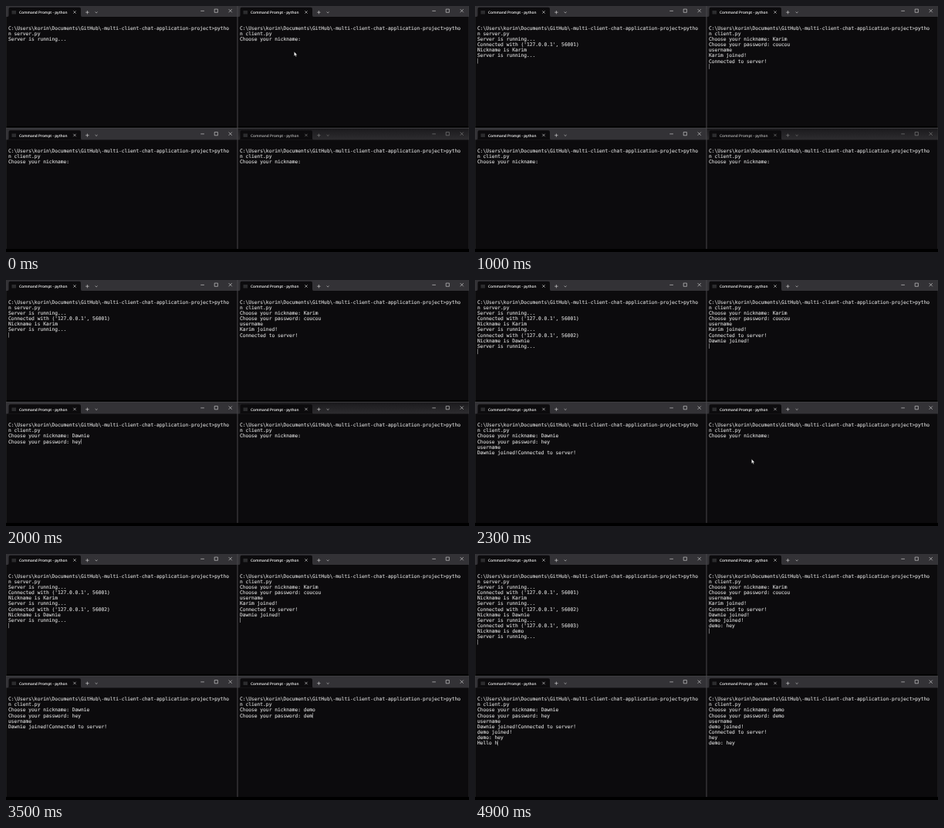
Recreate the animation shown at these times as an HTML page. Size 600 px wide and 319 px high, loop 5000 ms.

```html
<!DOCTYPE html>
<html lang="en">
<head>
<meta charset="utf-8">
<title>Chat in four terminals</title>
<style>
html, body { margin: 0; height: 100%; overflow: hidden; background: #000; }
svg { display: block; width: 600px; height: 319px; }
text { white-space: pre; text-rendering: geometricPrecision; }
.line { font: 6.25px "DejaVu Sans Mono", monospace; fill: #d4d4d4; stroke: #d4d4d4; stroke-width: .14; }
.title { font: 600 4.78px "Open Sans", sans-serif; fill: #fff; }
.icons { fill: none; stroke: #ddd; stroke-width: .6; }
.dim .title { fill: #bbb; }
.dim .icons { stroke: #888; }
</style>
</head>
<body>
<svg id="stage" viewBox="0 0 600 319"></svg>
<script>
const LOOP = 5000, CHAR = 3.763, LINE = 7.16, ROWS = 13;
const stage = document.getElementById('stage');

const shell = String.raw`C:\Users\korin\Documents\GitHub\-multi-client-chat-application-project>pytho` + '\nn ';
const client = shell + 'client.py\nChoose your nickname: ';
const askPassword = '\nChoose your password: ';
const accept = (port, name) =>
  `Connected with ('127.0.0.1', ${port})\nNickname is ${name}\nServer is running...\n`;
// one chunk of typing every 100 ms
const type = (start, ...chunks) => chunks.map((s, i) => [start + i * 100, s]);

// log: [time, appended text]; caret: times at which it toggles, starting hidden
const panels = [
  { x: 0, y: 0, caret: [1000], log: [
    [0, shell + 'server.py\nServer is running...\n'],
    [1000, accept(56001, 'Karim')],
    [2100, accept(56002, 'Dawnie')],
    [3600, accept(56003, 'demo')]] },
  { x: 300, y: 0, caret: [100, 700, 800, 1200, 2100], log: [
    [0, client],
    ...type(100, ...'Karim'),
    ...type(700, askPassword, 'cou', 'cou', '\nusername\nKarim joined!\nConnected to server!\n'),
    [2100, 'Dawnie joined!\n'],
    [3600, 'demo joined!\n'],
    [3800, 'demo: hey\n']] },
  { x: 0, y: 159.5, caret: [1300, 2300, 3600], log: [
    [0, client],
    ...type(1500, 'D', 'awn', 'i', 'e' + askPassword, 'h', 'ey',
      '\nusername\nDawnie joined!Connected to server!\n'),
    [3600, 'demo joined!\n'],
    [3800, 'demo: hey\n'],
    ...type(4500, 'He', 'l', 'l', 'o ', 'h')] },
  { x: 300, y: 159.5, caret: [2900, 4100], dimUntil: 1200, darkUntil: 2300, log: [
    [0, client],
    ...type(3100, 'd', 'em', 'o' + askPassword),
    ...type(3500, 'dem', 'o\nusername\ndemo joined!\nConnected to server!\n', 'hey', '\ndemo: hey\n')] }
];

// [time, x, y]; no position means hidden
const pointerPath = [
  [0, 373.4, 59.3], [100], [700, 373.4, 86.2], [800],
  [1200, 330, 150], [1300, 246, 222], [1500],
  [2300, 358.4, 232.3], [2400, 368, 240], [2500, 378, 246], [2600, 384, 240],
  [2700, 388, 226], [2800, 390, 214], [3100],
  [4000, 292, 205], [4100, 262, 206], [4200, 246, 208], [4300]
];

const windowMarkup = ({ x, y }) => `
  <g class="window" transform="translate(${x} ${y})">
    <rect y="-1" width="300" height="157" fill="#0c0b0d"/>
    <rect class="bar" y="-1" width="300" height="15"/>
    <path d="M2 14Q3.5 14 3.5 12V4Q3.5 1.8 5.5 1.8H95Q97 1.8 97 4V12Q97 14 98.5 14Z" fill="#0c0b0d"/>
    <rect x="7.5" y="6" width="5.5" height="4.5" fill="#2c2c2e"/>
    <text class="title" x="17" y="10.1" clip-path="url(#tab)">Command Prompt - python  c</text>
    <path class="icons" d="M87.3 6.3l3.4 3.4m0-3.4l-3.4 3.4M103.2 8.2h4.4m-2.2-2.2v4.4
      M115.6 7.6l1.5 1.4 1.5-1.4M252.3 6.4h4.6M270.2 4.1h4.2v4.2h-4.2zM288.6 4.1l4.2 4.2m0-4.2l-4.2 4.2"/>
    ${Array.from({ length: ROWS }, (_, i) =>
      `<text class="line" x="3" y="${30.6 + i * LINE}"></text>`).join('')}
    <rect class="caret" width=".6" height="6.8" fill="#bbb"/>
  </g>`;

stage.innerHTML = `
  <clipPath id="tab"><path d="M0 0H82V14H0Z"/></clipPath>
  <linearGradient id="shade" x2="0" y2="1">
    <stop stop-color="#1a191c"/><stop offset="1" stop-color="#2e2d30"/>
  </linearGradient>` + panels.map(windowMarkup).join('') + `
  <path d="M300 0V315" stroke="#48474a"/>
  <path d="M0 158.3H600" stroke="#545356" stroke-width=".8"/>
  <path d="M.2 0V315M599.8 0V315" stroke="#444" stroke-width=".4"/>
  <rect y="315" width="600" height="4"/>
  <path id="pointer" d="M0 0V5.6L1.3 4.4 2.2 6.5 3.1 6.1 2.2 4.1H4Z"
    fill="#fff" stroke="#000" stroke-width=".3"/>`;

const pointer = document.getElementById('pointer');
stage.querySelectorAll('.window').forEach((node, i) => Object.assign(panels[i], {
  node,
  rows: node.querySelectorAll('.line'),
  bar: node.querySelector('.bar'),
  cursor: node.querySelector('.caret')
}));

function drawPanel(p, t) {
  const lines = p.log.filter(e => e[0] <= t).map(e => e[1]).join('').split('\n');
  p.rows.forEach((row, i) => row.textContent = lines[i] || '');
  const last = lines.length - 1;
  p.cursor.setAttribute('x', 3 + lines[last].length * CHAR);
  p.cursor.setAttribute('y', 24.9 + last * LINE);
  const shown = p.caret.filter(c => c <= t).length % 2;
  p.cursor.setAttribute('visibility', shown ? 'visible' : 'hidden');
  p.node.classList.toggle('dim', t < p.dimUntil);
  p.bar.setAttribute('fill', t < p.darkUntil ? 'url(#shade)' : '#333236');
}

function draw(t) {
  panels.forEach(p => drawPanel(p, t));
  const [, x, y] = pointerPath.filter(k => k[0] <= t).pop();
  pointer.setAttribute('visibility', x ? 'visible' : 'hidden');
  if (x) pointer.setAttribute('transform', `translate(${x} ${y})`);
}

const start = performance.now();
let shownStep = -1;
function tick() {
  const t = (performance.now() - start) % LOOP;
  const step = Math.floor(t / 100);
  if (step !== shownStep) draw((shownStep = step) * 100);
  requestAnimationFrame(tick);
}
tick();
</script>
</body>
</html>
```
